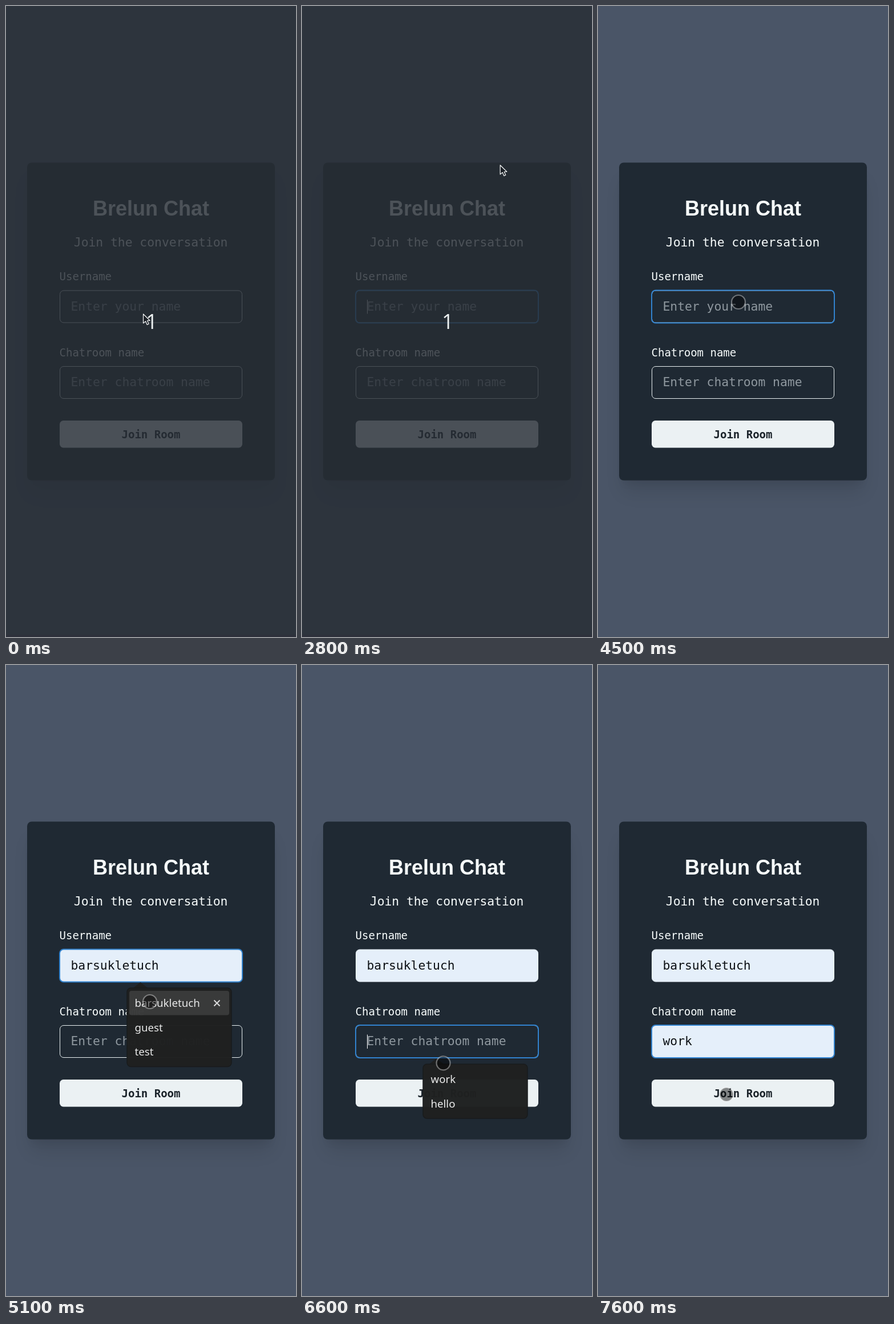
Recreate the animation shown at these times as an HTML page. Size 508x1102 px, loop 8 s.

```html
<!DOCTYPE html>
<html lang="en">
<head>
<meta charset="utf-8">
<title>Chat login</title>
<style>
  html, body { margin: 0; width: 100%; height: 100%; overflow: hidden; background: #4a5567; }
  svg { display: block; width: 508px; height: 1102px; }
  text { white-space: pre; }
  .mono { font-family: "DejaVu Sans Mono", monospace; }
  .title { font: bold 36px "Liberation Sans", Arial, sans-serif; }
  .lead, .value { font-size: 21.33px; }
  .label, .button { font-size: 19px; }
  .button { font-weight: bold; }
  .item { font: 500 18.67px "Noto Sans", sans-serif; fill: #ececec; }
  .count { font: 36px "Open Sans", "Noto Sans", sans-serif; fill: #eef2f2; }
</style>
</head>
<body>
<svg viewBox="0 0 508 1102" xmlns="http://www.w3.org/2000/svg">
  <defs>
    <filter id="soft" x="-30%" y="-30%" width="160%" height="160%"><feGaussianBlur stdDeviation="16.7"/></filter>
    <filter id="tight" x="-20%" y="-20%" width="140%" height="140%"><feGaussianBlur stdDeviation="6.7"/></filter>
  </defs>
  <rect width="508" height="1102" fill="#4a5567"/>
  <rect x="43.7" y="307" width="420.6" height="541.6" rx="6" opacity=".1" filter="url(#soft)"/>
  <rect x="43.7" y="293.5" width="420.6" height="541.6" rx="6" opacity=".05" filter="url(#tight)"/>
  <rect x="37" y="273.5" width="434" height="555" rx="8" fill="#1f2933"/>
  <g fill="#f7fcfc">
    <text class="title" x="254" y="366" text-anchor="middle">Brelun Chat</text>
    <text class="mono lead" x="118.8" y="419.5">Join the conversation</text>
    <text class="mono label" x="93.5" y="479">Username</text>
    <text class="mono label" x="93.5" y="612">Chatroom name</text>
  </g>
  <g id="fields"></g>
  <rect x="94" y="724" width="320" height="47.5" rx="6.5" fill="#ebf1f3"/>
  <text class="mono button" x="254" y="754.5" text-anchor="middle" fill="#1a2229">Join Room</text>
  <g id="popups"></g>
  <g id="dim">
    <rect width="508" height="1102" fill="#272d34" opacity=".815"/>
    <rect y="1098" width="508" height="4" fill="#2e303b" opacity=".7"/>
    <text class="count" x="245" y="564">1</text>
  </g>
  <path id="arrow" d="M0 0V16L4 12.6L6.6 18.6L9.6 17.3L7 11.5H11.6Z" fill="#1b2026" stroke="#f4f6f6" stroke-width="1.2" stroke-linejoin="round"/>
  <circle id="dot" r="12" fill="#000" fill-opacity=".45" stroke="#fff" stroke-opacity=".38" stroke-width="2.2"/>
</svg>
<script>
const LOOP = 8000, STEP = 100;
const $ = id => document.getElementById(id);
const clamp = v => Math.max(0, Math.min(1, v));
const ramp = (t, from, to) => clamp((t - from) / (to - from));
const within = (t, spans) => spans.some(([a, b]) => t >= a && t < b);

function add(parent, tag, attrs, text) {
  const el = document.createElementNS("http://www.w3.org/2000/svg", tag);
  set(el, attrs);
  if (text) el.textContent = text;
  parent.appendChild(el);
  return el;
}

function set(el, attrs) {
  for (const k in attrs) el.setAttribute(k, attrs[k]);
}

function makeField(top, hint, value) {
  const g = $("fields");
  return {
    hint, value,
    box: add(g, "rect", { x: 94.5, y: top + .5, width: 319, height: 56, rx: 6.5 }),
    ring: add(g, "rect", { x: 94, y: top, width: 320, height: 57, rx: 7, fill: "none", stroke: "#3182ce", "stroke-width": 2 }),
    text: add(g, "text", { class: "mono value", x: 113.5, y: top + 35 }),
    caret: add(g, "rect", { y: top + 16.5, width: 1, height: 24.5 })
  };
}

function drawField(f, filled, focus, caret) {
  set(f.box, { fill: filled ? "#e5effa" : "#1f2933", stroke: filled ? "#e8f0f8" : "#e9f0f1" });
  f.ring.setAttribute("opacity", focus);
  f.text.textContent = filled ? f.value : f.hint;
  f.text.setAttribute("fill", filled ? "#0c1014" : "#8f989f");
  set(f.caret, {
    x: filled ? Math.floor(113.5 + 12.84 * f.value.length) : 114,
    fill: filled ? "#000" : "#fff",
    opacity: caret ? 1 : 0
  });
}

// Suggestion list hanging below a field; the first row can be highlighted.
function makePopup(top, items) {
  const g = add($("popups"), "g", {});
  const h = items.length * 42.5 + 10, y = top + 10;
  add(g, "path", { d: `M223 ${y}L235.5 ${top}L248 ${y}Z`, fill: "#1e1f1f" });
  add(g, "rect", { x: 212, y, width: 183, height: h, rx: 7, fill: "#1f2020", stroke: "#191b1c", "stroke-width": 1.5 });
  const hover = add(g, "g", {});
  add(hover, "rect", { x: 216, y: y + 5, width: 175, height: 42.5, rx: 4, fill: "#fff", opacity: .12 });
  add(hover, "path", { d: `M364.5 ${y + 21.5}l10 10m0 -10l-10 10`, stroke: "#ddd", "stroke-width": 2 });
  items.forEach((s, i) => add(g, "text", { class: "item", x: 225.5, y: y + 33 + i * 42.5 }, s));
  return { g, hover };
}

function drawPopup(p, alpha, hover) {
  p.g.setAttribute("opacity", alpha);
  p.hover.setAttribute("opacity", hover ? 1 : 0);
}

const user = makeField(496.5, "Enter your name", "barsukletuch");
const room = makeField(629, "Enter chatroom name", "work");
const userList = makePopup(554, ["barsukletuch", "guest", "test"]);
const roomList = makePopup(687, ["work", "hello"]);

// time, x, y
const path = [
  [0, 240.5, 538], [900, 325.5, 357.5], [1000, 325.5, 354.5], [1300, 325.5, 354.5],
  [1600, 338.5, 293.5], [1700, 338.5, 293.5], [2000, 341, 296], [2200, 341, 296],
  [2500, 347.2, 278], [3000, 347.2, 278], [3100, 348, 280], [3700, 348, 280],
  [4500, 246, 517], [4600, 245, 521], [5000, 252, 588], [5400, 252, 588],
  [6000, 214.5, 661], [6100, 214.5, 661], [6300, 232, 661], [6800, 256, 714],
  [7000, 256, 714], [7600, 225, 750], [8000, 225, 750]
];

function pointer(t) {
  const i = path.findIndex((p, k) => k > 0 && t <= p[0]);
  const [a, ax, ay] = path[i - 1], [b, bx, by] = path[i];
  let u = ramp(t, a, b);
  u = u * u * (3 - 2 * u);
  return [ax + (bx - ax) * u, ay + (by - ay) * u];
}

const userCaret = [[1800, 2300], [2800, 3400], [3900, 4400], [4600, 4900], [5400, 5900]];
const roomCaret = [[6300, 6700], [6800, 7400]];

function draw(t) {
  const dim = t < 3100;
  const away = ramp(t, 6100, 6400);
  drawField(user, t >= 4900, ramp(t, 1700, 2000) * (1 - away), within(t, userCaret));
  drawField(room, t >= 6700, away, within(t, roomCaret));
  drawPopup(userList, .98 * ramp(t, 4500, 4700) * (1 - ramp(t, 5350, 5700)), t >= 4900);
  drawPopup(roomList, .98 * ramp(t, 6300, 6500) * (1 - ramp(t, 6950, 7300)), t >= 6700);

  const at = `translate(${pointer(t)})`;
  for (const [id, on] of [["arrow", dim], ["dot", !dim]]) {
    set($(id), { transform: at, visibility: on ? "visible" : "hidden" });
  }
  $("dim").setAttribute("visibility", dim ? "visible" : "hidden");
}

const start = performance.now();
function tick() {
  const t = (performance.now() - start) % LOOP;
  draw(Math.floor(t / STEP) * STEP);
  requestAnimationFrame(tick);
}
tick();
</script>
</body>
</html>
```
